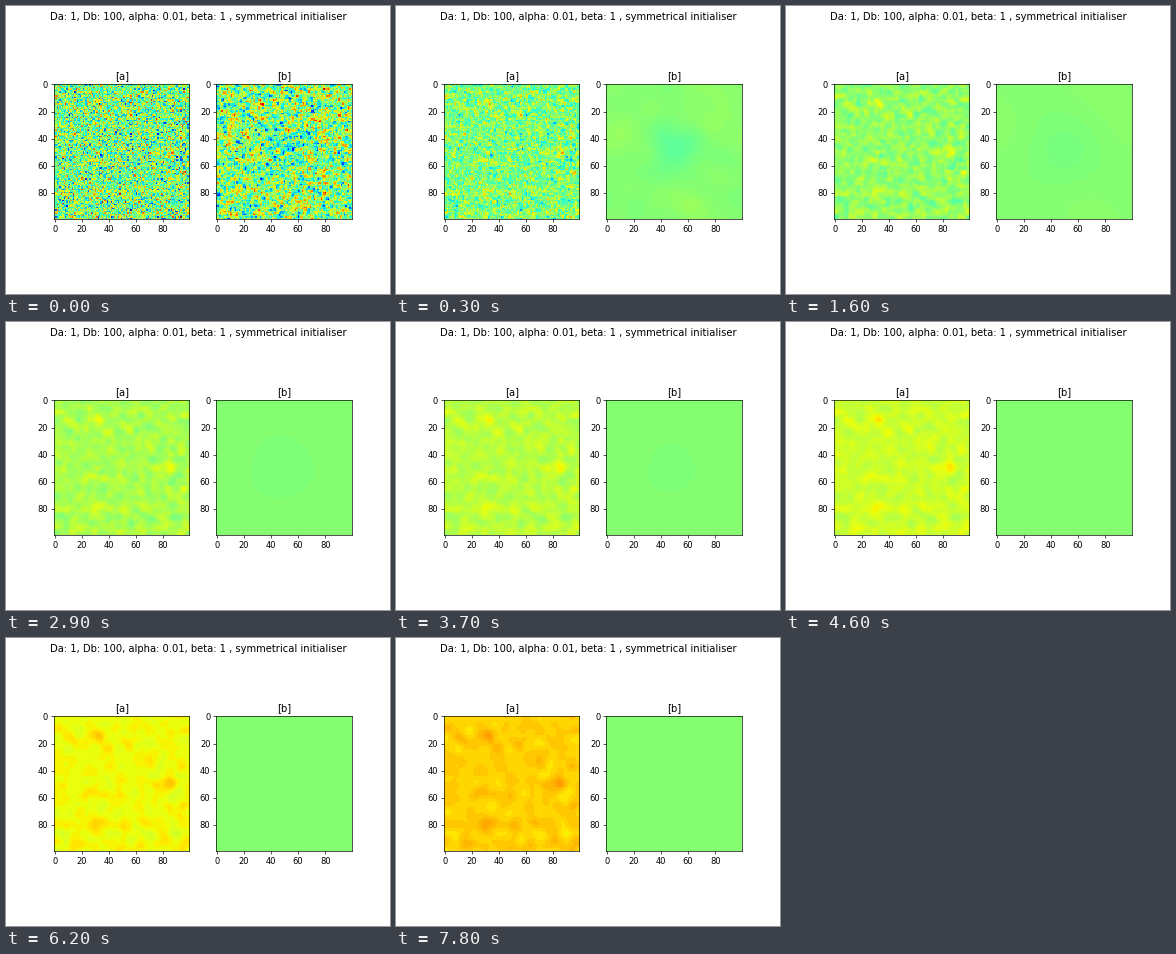
Animation, 384 px wide and 288 px high, one loop 8 s. Source, as a matplotlib script:

```python
import numpy as np
import matplotlib.pyplot as plt
from matplotlib.animation import FuncAnimation

N = 100            # grid cells per side
DA, DB = 0.6, 100  # effective diffusion rates
FRAMES, INTERVAL = 80, 100
LAST = 78          # the final state is held

rng = np.random.default_rng(7)
freq = np.fft.fftfreq(N)
wave = 2 * np.cos(2 * np.pi * freq) - 2
lam = wave[:, None] + wave[None, :]  # eigenvalues of the grid Laplacian
mode = N * np.hypot(freq[:, None], freq[None, :])
yy, xx = np.mgrid[:N, :N]


def spot(x, y, mass, s):
    """Gaussian spot on the periodic grid."""
    dx = (xx - x + N / 2) % N - N / 2
    dy = (yy - y + N / 2) % N - N / 2
    return mass * np.exp(-(dx**2 + dy**2) / (2 * s**2)) / (2 * np.pi * s**2)


def spectrum(std, spots):
    """Seeded noise without its slowest modes, plus a few lasting spots."""
    noise = np.fft.fft2(rng.normal(0, std, (N, N)))
    spec = np.where(mode > 3, noise, 0) + np.fft.fft2(sum(spots))
    spec[0, 0] = 0
    return spec


def diffuse(spec, amount):
    return np.fft.ifft2(spec * np.exp(lam * amount)).real


spec_a = spectrum(0.13, [spot(x, y, 3.8, 2)
                         for x, y in ((33, 17), (86, 50), (30, 80))])

# a cold centre between three warm lobes
lobes = [spot(50 + 42 * np.cos(p), 48 + 42 * np.sin(p), 16, 8)
         for p in np.radians((75, 195, 315))]
spec_b = spectrum(0.27, lobes + [spot(50, 48, -40, 8)])


def field_a(t):
    return 0.5 + 0.017 * t + 0.0009 * t**2 + diffuse(spec_a, DA * t)


def field_b(t):
    return 0.511 + diffuse(spec_b, DB * t + 0.25)


fig, axes = plt.subplots(1, 2, figsize=(6.4, 4.8), dpi=60)
fig.suptitle("Da: 1, Db: 100, alpha: 0.01, beta: 1 , symmetrical initialiser")
images = []
for ax, name, field, levels in zip(axes, "ab", (field_a, field_b), (64, 128)):
    images.append(ax.imshow(field(0), cmap=plt.get_cmap("jet", levels),
                            vmin=0, vmax=1, interpolation="nearest"))
    ax.set_title(f"[{name}]")
    ax.set_xticks(range(0, N, 20))
    ax.set_yticks(range(0, N, 20))


def update(i):
    t = min(i, LAST) * INTERVAL / 1000
    images[0].set_data(field_a(t))
    images[1].set_data(field_b(t))
    return images


anim = FuncAnimation(fig, update, frames=FRAMES, interval=INTERVAL,
                     repeat=True, repeat_delay=0)
plt.show()
```
